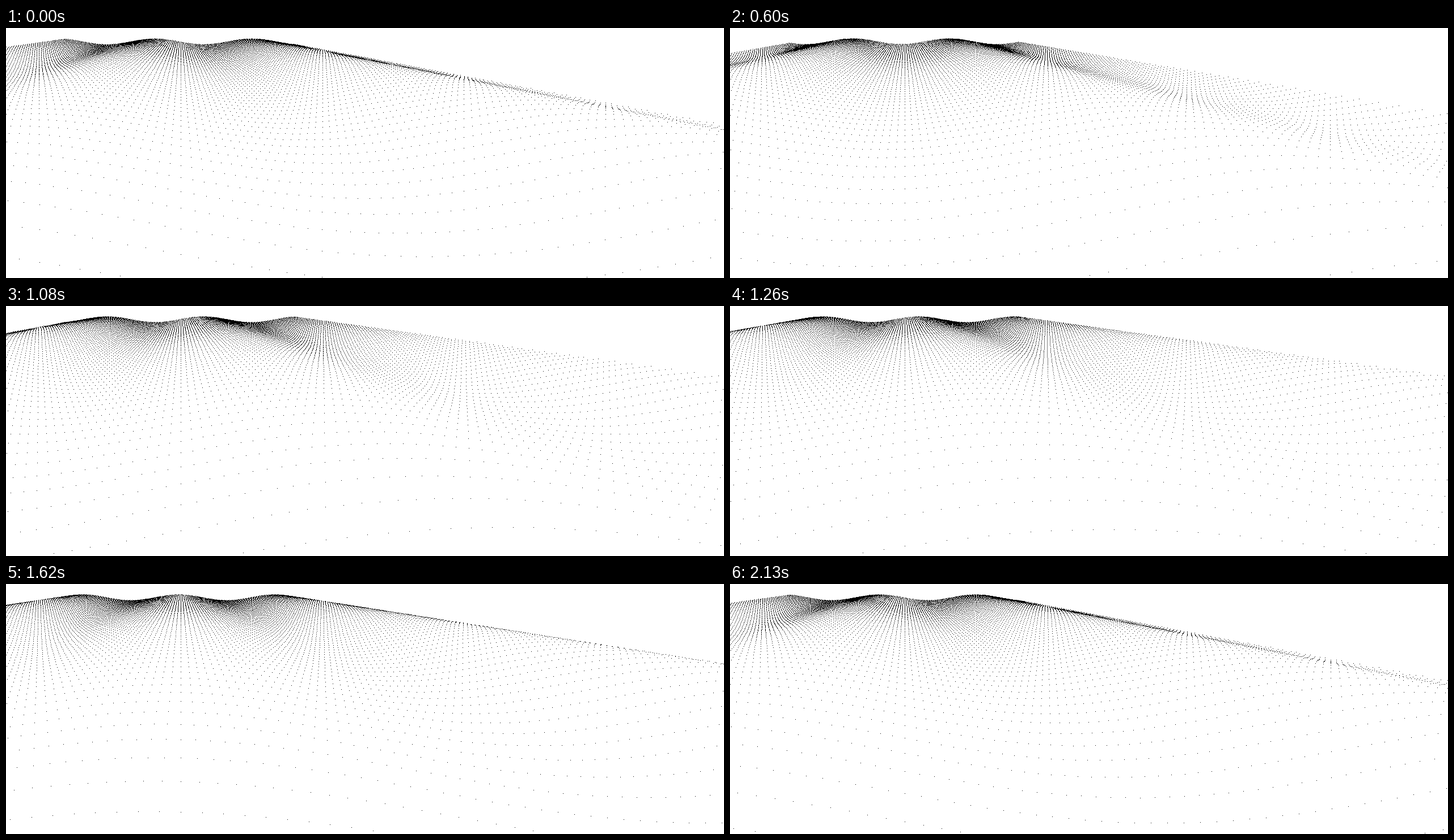
Animation, 1266 px wide and 442 px high, one loop 2160 ms. Source, as an HTML page with a canvas:

```html
<!DOCTYPE html>
<html lang="en">
<head>
<meta charset="utf-8">
<title>Dot wave</title>
<style>
  html, body { margin: 0; width: 100%; height: 100%; overflow: hidden; background: #fff; }
  canvas { display: block; width: 1266px; height: 442px; }
</style>
</head>
<body>
<canvas id="stage" width="1266" height="442"></canvas>
<script>
const W = 1266, H = 442, LOOP = 2160, STEP = 30;

// Camera: focal length and vanishing point in px, distances in grid cells
const FOCAL = 250, VX = 308.4, VY = -8.9;
const NEAR = 4, FAR = 99;
const LEFT = -80, RIGHT = 79;

// Wave across the grid, and its speed per step
const HEIGHT = 12.925, AMP = 1.99, FREQ = 0.0942, TROUGH = 15.5;
const WAVE_STEP = 0.95, ROW_STEP = 0.177, ROW_START = 0.025;

const ctx = document.getElementById('stage').getContext('2d');
const image = ctx.createImageData(W, H);
const pixels = new Uint32Array(image.data.buffer);
const WHITE = 0xffffffff, BLACK = 0xff000000;

const fract = v => v - Math.floor(v);

function draw(step) {
  const trough = TROUGH - WAVE_STEP * step;
  const drop = [];
  for (let k = LEFT; k <= RIGHT; k++) {
    drop.push(HEIGHT + AMP * Math.cos(FREQ * (k - trough)));
  }

  pixels.fill(WHITE);
  for (let d = NEAR + fract(ROW_START - ROW_STEP * step); d <= FAR; d++) {
    const scale = FOCAL / d;
    for (let k = LEFT; k <= RIGHT; k++) {
      const x = Math.floor(VX + k * scale);
      const y = Math.floor(VY + drop[k - LEFT] * scale);
      if (x >= 0 && x < W && y >= 0 && y < H) pixels[y * W + x] = BLACK;
    }
  }
  ctx.putImageData(image, 0, 0);
}

let shown = -1;
function tick() {
  // The first pose is held for two steps
  const step = Math.max(0, Math.floor((performance.now() % LOOP) / STEP) - 1);
  if (step !== shown) draw(shown = step);
  requestAnimationFrame(tick);
}
tick();
</script>
</body>
</html>
```
